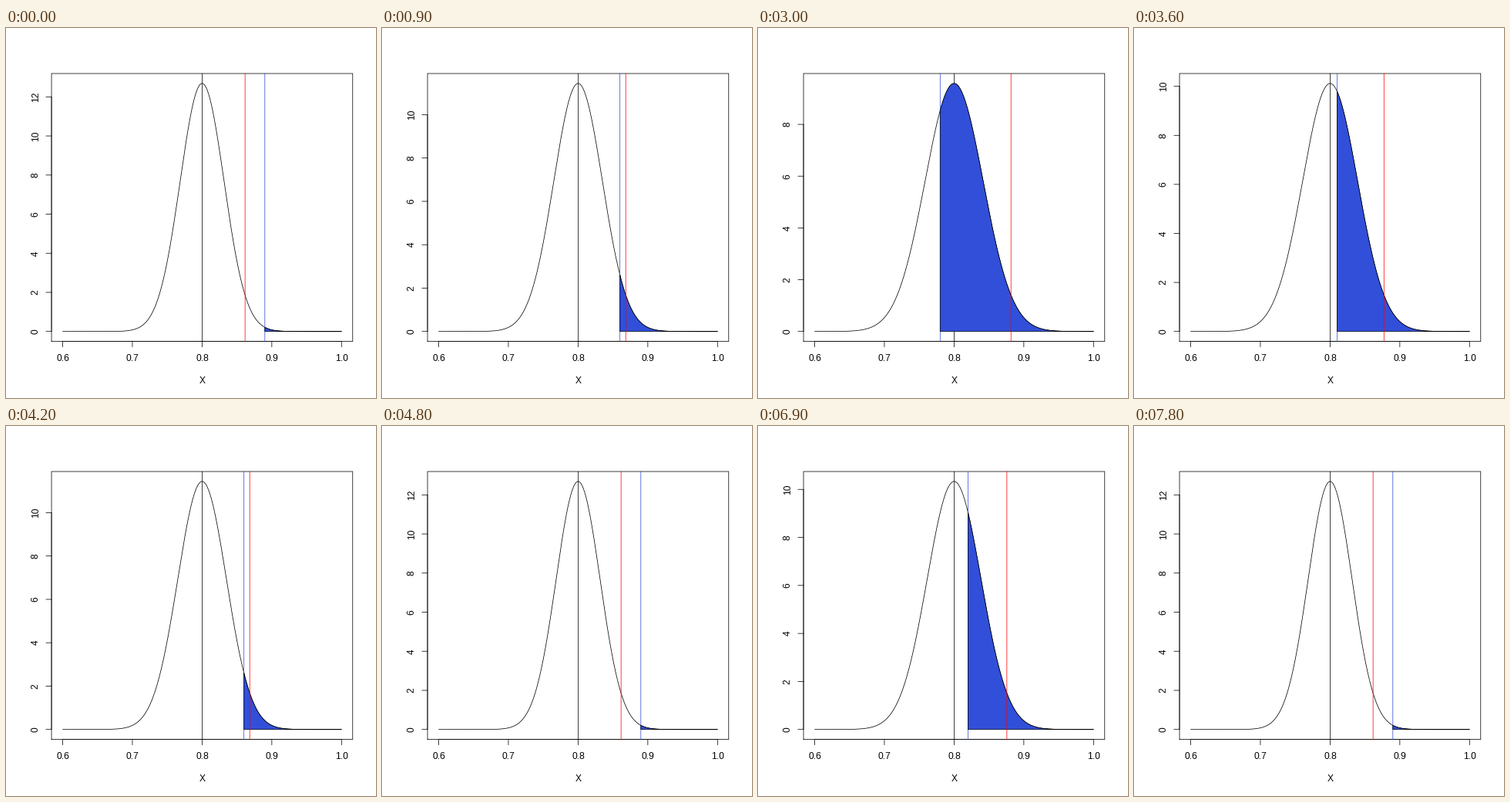
Animation of 480 by 480 pixels, one loop 8000 ms. Source, as a matplotlib script:

```python
import numpy as np
import matplotlib.pyplot as plt
from matplotlib.animation import FuncAnimation

plt.rcParams.update({
    "font.family": "Liberation Sans",
    "font.size": 12,
    "path.snap": False,
    "lines.solid_capstyle": "round",
    "lines.solid_joinstyle": "round",
})

SIZE, DPI = 480, 72
LEFT, RIGHT, TOP, BOTTOM = 59.04, 449.76, 59.04, 406.56
LINE, TICK, LW = 14.4, 7.2, 0.75
BLUE, RED = "#314fd9", "#ff0000"
MEAN, N = 0.8, 100
STEP_FRAMES, FRAMES, INTERVAL = 3, 80, 100

# Successes out of N in each simulated sample
SAMPLES = [89, 87, 85, 86, 88, 90, 87, 84, 86,
           88, 78, 87, 81, 88, 86, 87, 89, 86,
           81, 87, 90, 88, 87, 82, 86, 88, 89]


def px(x):
    unit = (RIGHT - LEFT) / 1.08
    return LEFT + unit * (0.04 + (x - 0.6) / 0.4)


def py(y, peak):
    unit = (BOTTOM - TOP) / 1.08
    return BOTTOM - unit * (0.04 + y / peak)


fig = plt.figure(figsize=(SIZE / DPI, SIZE / DPI), dpi=DPI, facecolor="white")
ax = fig.add_axes([0, 0, 1, 1])
ax.set_xlim(0, SIZE)
ax.set_ylim(SIZE, 0)
ax.axis("off")


def line(xs=(), ys=(), color="black", z=2):
    return ax.plot(xs, ys, color=color, lw=LW, zorder=z)[0]


def label(x, y, text, rotation=0):
    return ax.text(x, y, text, ha="center", va="baseline",
                   rotation=rotation, rotation_mode="anchor")


# Frame, horizontal axis and null mean stay put
line([LEFT, RIGHT, RIGHT, LEFT, LEFT], [BOTTOM, BOTTOM, TOP, TOP, BOTTOM])
line([px(0.6), px(1.0)], [BOTTOM, BOTTOM])
for value in (0.6, 0.7, 0.8, 0.9, 1.0):
    line([px(value)] * 2, [BOTTOM, BOTTOM + TICK])
    label(px(value), BOTTOM + 1.8 * LINE, f"{value:.1f}")
label((LEFT + RIGHT) / 2, BOTTOM + 3.8 * LINE, "X")
line([px(MEAN)] * 2, [TOP, BOTTOM], z=3)

curve = line(z=2)
observed = line(color=BLUE, z=3)
tail = ax.fill([0, 0, 0], [0, 0, 0], facecolor=BLUE, edgecolor="black",
               lw=LW, joinstyle="round", zorder=4)[0]
critical = line(color=RED, z=5)
y_axis = line()
y_values = range(0, 15, 2)
y_ticks = [line() for _ in y_values]
y_labels = [label(LEFT - 1.2 * LINE, 0, str(v), 90) for v in y_values]


def draw(frame):
    p = SAMPLES[frame // STEP_FRAMES] / N
    sd = np.sqrt(p * (1 - p) / (N - 1))
    peak = 1 / (sd * np.sqrt(2 * np.pi))

    def density(x):
        return peak * np.exp(-((x - MEAN) / sd) ** 2 / 2)

    x = np.linspace(0.6, 1, 401)
    curve.set_data(px(x), py(density(x), peak))

    x = np.linspace(p, 1, 201)
    xs = np.concatenate([[p], x, [1]])
    ys = np.concatenate([[0], density(x), [0]])
    tail.set_xy(np.column_stack([px(xs), py(ys, peak)]))

    observed.set_data([px(p)] * 2, [TOP, BOTTOM])
    critical.set_data([px(MEAN + 1.96 * sd)] * 2, [TOP, BOTTOM])

    last = 2 * int(peak * 1.04 // 2)
    y_axis.set_data([LEFT, LEFT], [py(0, peak), py(last, peak)])
    for value, tick, text in zip(y_values, y_ticks, y_labels):
        y = py(value, peak)
        tick.set_data([LEFT - TICK, LEFT], [y, y])
        text.set_y(y)
        tick.set_visible(value <= last)
        text.set_visible(value <= last)
    return []


anim = FuncAnimation(fig, draw, frames=FRAMES, interval=INTERVAL,
                     repeat=True, repeat_delay=0, blit=False)
plt.show()
```
